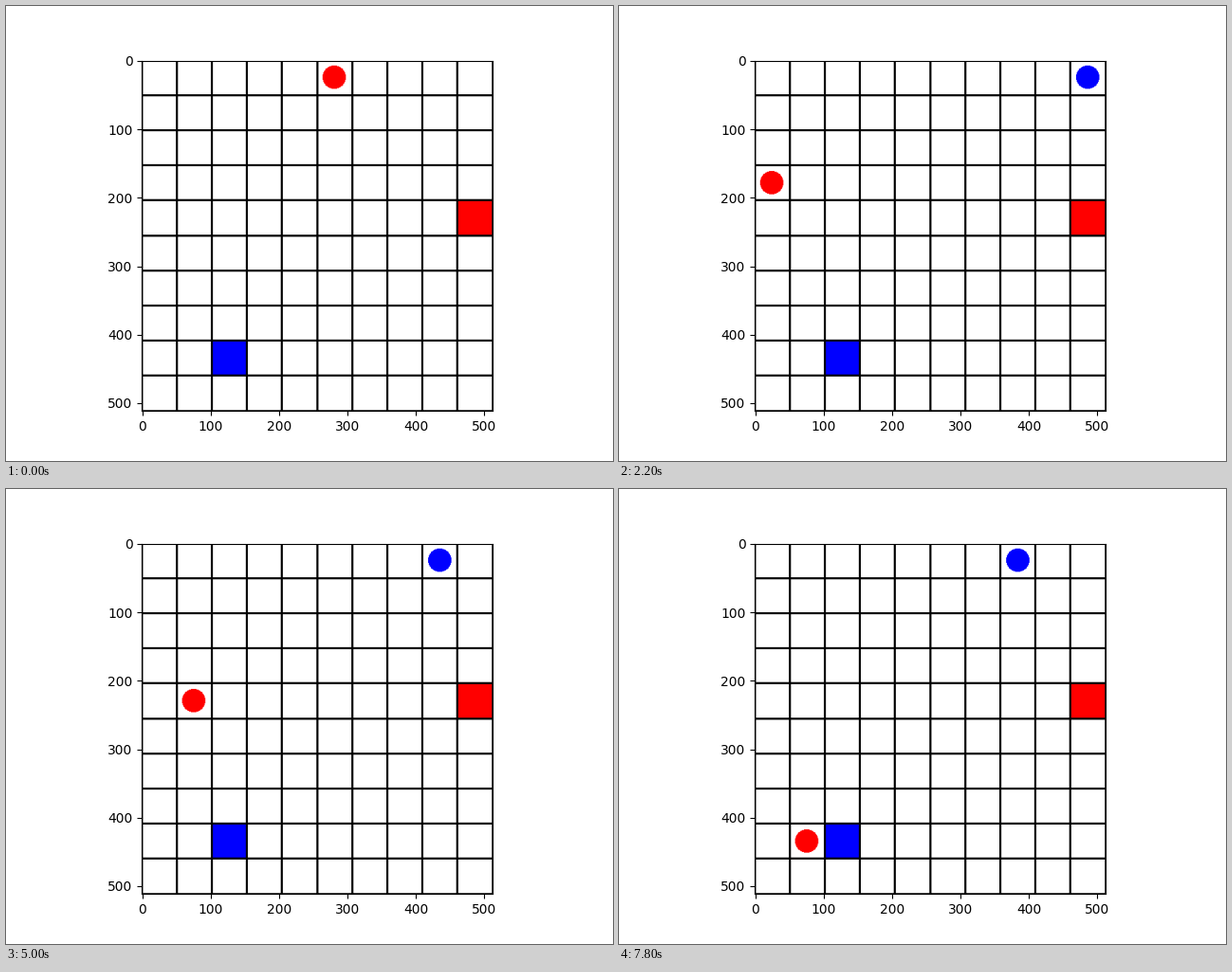
Animation, 640 px wide and 480 px high, one loop 8 s. Source, as a matplotlib script:

```python
import matplotlib.pyplot as plt
import numpy as np
from matplotlib.animation import FuncAnimation

SIZE, CELLS = 512, 10
CELL = SIZE / CELLS
RED, BLUE, BLACK = (255, 0, 0), (0, 0, 255), (0, 0, 0)
STEP = {"L": (-1, 0), "R": (1, 0), "U": (0, -1), "D": (0, 1), ".": (0, 0)}

# One move per tick, "." means the agent stays where it is
RED_MOVES = "L..DLDLLL.DD.UR.RLLDD.U.RD.D.D..DLU.DR."
BLUE_MOVES = "UUD..U.U.U....DU.LL.LR..R.L.L.RRR..L..L"


def walk(start, moves):
    return np.cumsum([start] + [STEP[m] for m in moves], axis=0)


red_path = walk((5, 0), RED_MOVES)
blue_path = walk((9, 4), BLUE_MOVES)
rows, cols = np.mgrid[:SIZE, :SIZE] + 0.5


def disc(img, cell, color):
    cx, cy = (int((c + 0.5) * CELL) for c in cell)
    r = int(CELL / 3)
    img[(cols - cx) ** 2 + (rows - cy) ** 2 < r * r] = color


def square(img, cell, color):
    x, y = (int(c * CELL) for c in cell)
    w = int(CELL)
    img[y:y + w, x:x + w] = color


def grid_lines(img):
    for i in range(CELLS + 1):
        p = int(i * CELL)
        band = slice(max(p - 1, 0), p + 2)
        img[band] = BLACK
        img[:, band] = BLACK


def board(tick):
    img = np.full((SIZE, SIZE, 3), 255, np.uint8)
    disc(img, blue_path[tick], BLUE)
    disc(img, red_path[tick], RED)
    # Goals cover any agent standing on them
    square(img, (9, 4), RED)
    square(img, (2, 8), BLUE)
    grid_lines(img)
    return img


fig, ax = plt.subplots(figsize=(6.4, 4.8), dpi=100)
view = ax.imshow(board(0))


def update(tick):
    view.set_data(board(tick))
    return [view]


anim = FuncAnimation(fig, update, frames=len(red_path), interval=200,
                     repeat=True, repeat_delay=0)
plt.show()
```
